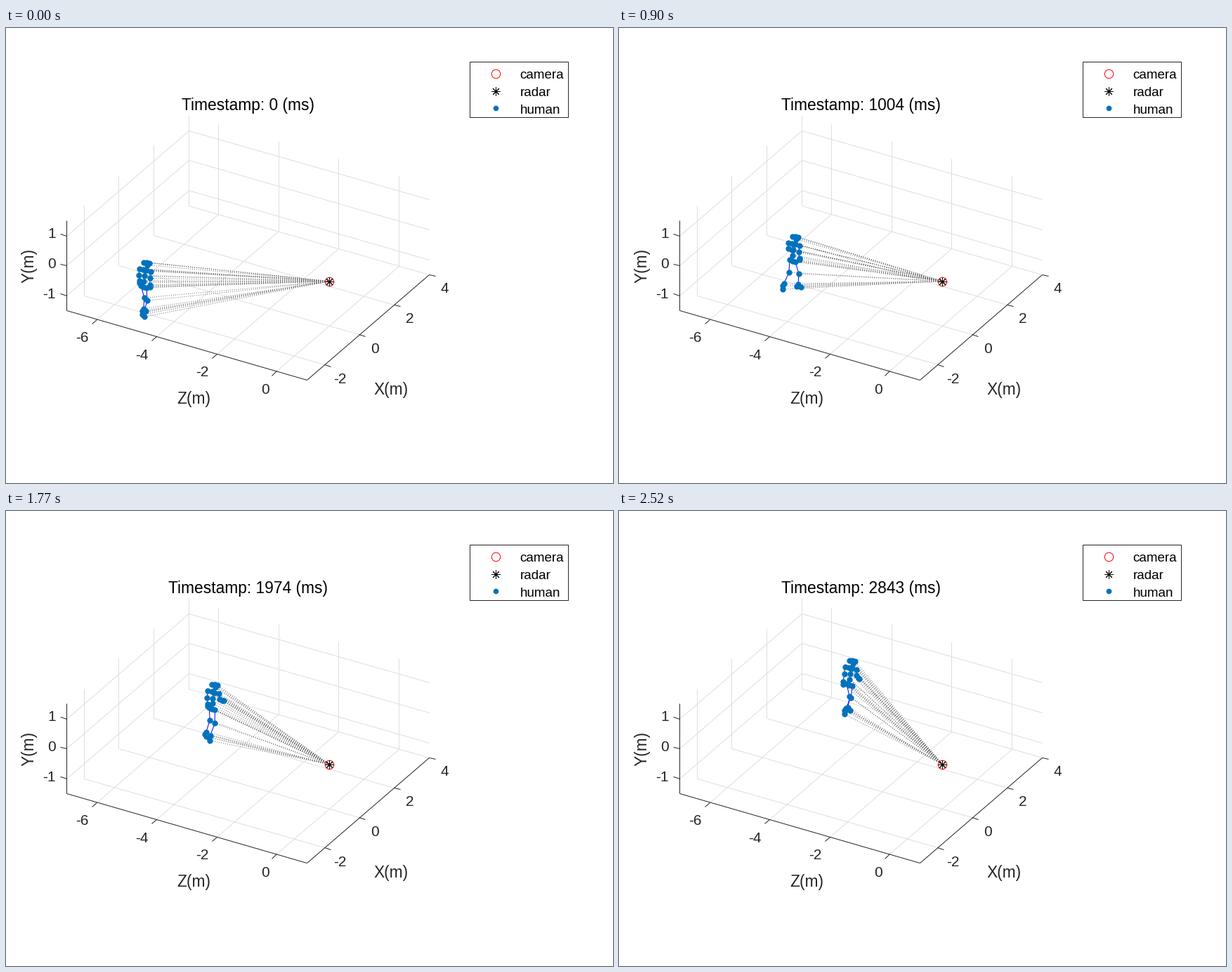
Write a matplotlib script that moves like this. It is 864 px wide and 648 px high and loops after 2550 ms.

```python
import numpy as np
import matplotlib.pyplot as plt
from matplotlib.animation import FuncAnimation
from matplotlib.collections import LineCollection

W, H, DPI = 864, 648, 150
FRAMES, INTERVAL = 85, 30
TICK_MS = 33.45          # sensor period
STRIDE = 750 / TICK_MS   # sensor ticks per walking cycle
THIN = 72 / DPI          # one pixel
INK, BLUE = "#262626", "#0072BD"

plt.rcParams["font.family"] = "Liberation Sans"
fig = plt.figure(figsize=(W / DPI, H / DPI), dpi=DPI, facecolor="white")
ax = fig.add_axes([0, 0, 1, 1])
ax.set_xlim(-0.5, W - 0.5)
ax.set_ylim(H - 0.5, -0.5)
ax.axis("off")

# Orthographic view: screen pixels per metre along each world axis
CORNER = np.array([86, 402.3])
AX_X = np.array([24.8, -21.4])
AX_Y = np.array([0, -42.7])
AX_Z = np.array([42.75, 12.3])


def project(x, y, z):
    return CORNER + (x + 3) * AX_X + (y + 1.5) * AX_Y + (z + 7) * AX_Z


def add_lines(pairs, color, order, style="solid"):
    lines = LineCollection(pairs, colors=color, linewidths=THIN, linestyles=style, zorder=order)
    lines.set_snap(False)
    return ax.add_collection(lines)


def label(x, y, text, size=10, color=INK, ha="center", **kw):
    return ax.text(x, y, text, fontsize=size, color=color, ha=ha, va=kw.pop("va", "baseline"), **kw)


def draw_box():
    grid, ticks = [], []
    for x in (-2, 0, 2, 4):
        end = project(x, -1.5, 1)
        grid += [(project(x, -1.5, -7), end), (project(x, -1.5, -7), project(x, 1.5, -7))]
        ticks.append((end, end + 0.21 * AX_Z))
        label(*(end + (22, 26)), str(x), ha="center")
    for z in (-6, -4, -2, 0):
        end = project(-3, -1.5, z)
        grid += [(end, project(4, -1.5, z)), (project(4, -1.5, z), project(4, 1.5, z))]
        ticks.append((end, end - 0.29 * AX_X))
        label(*(end + (-17 if z == 0 else -21, 32)), str(z))
    for y in (-1, 0, 1):
        end = project(-3, y, -7)
        grid += [(end, project(4, y, -7)), (project(4, y, -7), project(4, y, 1))]
        ticks.append((end, end - 0.21 * AX_Z))
        label(70.5, end[1] + 3.4, str(y), ha="right")
    low, front = project(-3, -1.5, -7), project(-3, -1.5, 1)
    edges = [(low, project(-3, 1.5, -7)), (low, front), (front, project(4, -1.5, 1))]
    add_lines(np.round(grid), "#dfdfdf", 1)
    add_lines(np.round(edges + ticks), INK, 2)
    label(267, 534, "Z(m)", 10.9)
    label(548, 521.5, "X(m)", 10.9)
    label(33, 338, "Y(m)", 10.9, rotation=90, va="center")


def draw_camera(x, y):
    ax.plot(x, y, "o", ms=6, mfc="none", mec="red", mew=THIN, zorder=7)


def draw_radar(x, y):
    ax.plot(x, y, marker=(8, 2, 0), ms=6, mec="black", mew=THIN, zorder=8)


def draw_legend():
    ax.add_patch(plt.Rectangle((660, 48), 140, 79, fc="white", ec=INK, lw=THIN, snap=False))
    draw_camera(696, 64)
    draw_radar(696, 89)
    ax.plot(696, 113, "o", ms=3.7, color=BLUE, mew=0)
    for i, name in enumerate(("camera", "radar", "human")):
        label(731, 71.5 + 24.8 * i, name, 9, "black", "left")


# Path of the neck on screen, and the body's fixed offsets from it
KEYS = np.array([0, 13, 30, 39, 51, 66, 85])
PATH = np.array([(197, 344), (210, 328), (248, 307), (265, 290), (281, 267), (306, 250), (329, 223)])
PELVIS = np.array([-1.5, 24])
HEAD = np.array([(3, -7), (-2, -11), (2, -11), (6, -10)])
SHOULDER = np.array([8, 2])
HIP = np.array([4, 1.5])
# Part of the cycle at which each limb is furthest forward, left then right
LEG_LEAD = (0.93, 0.28)
ARM_LEAD = (0.3, 0.65)


def spline(values, k):
    """Cubic Hermite curve through the key values."""
    slope = np.gradient(values, KEYS, axis=0)
    i = min(np.searchsorted(KEYS, k, side="right") - 1, len(KEYS) - 2)
    h = KEYS[i + 1] - KEYS[i]
    u = (k - KEYS[i]) / h
    return ((1 + 2 * u) * (1 - u) ** 2 * values[i] + u * (1 - u) ** 2 * h * slope[i]
            + u * u * (3 - 2 * u) * values[i + 1] + u * u * (u - 1) * h * slope[i + 1])


def angle(k, lead):
    return 2 * np.pi * (k / STRIDE - lead)


def leg(hip, a):
    """Knee, ankle, heel and toe; the foot lifts while it trails."""
    reach = 0.28 * np.cos(a) - 0.1
    lift = 0.28 * max(0, -np.cos(a - 0.17))
    ankle = hip + reach * AX_X + (lift - 0.84) * AX_Y
    knee = (hip + ankle) / 2 + 0.12 * AX_X - 0.08 * AX_Y
    toe = ankle + (2, 5) + 0.4 * reach * AX_X
    return [knee, ankle, ankle + (-2, 3), toe]


def arm(shoulder, a):
    """Elbow, wrist and hand, swinging about the shoulder."""
    swing = np.cos(a)
    elbow = shoulder + 0.04 * swing * AX_X - 0.22 * AX_Y
    hand = elbow + 0.15 * swing * AX_X + (0.08 * swing - 0.2) * AX_Y + (2, 0)
    return [elbow, elbow + 0.75 * (hand - elbow), hand]


def skeleton(k):
    """Chains of joints: spine with head, face, arms and legs."""
    neck = spline(PATH, k)
    pelvis = neck + PELVIS
    head = neck + HEAD
    spine = [neck + u * PELVIS for u in (1, 0.68, 0.36, 0)]
    chains = [spine + [head[0], head[2]], head[1:]]
    for sign, leg_lead, arm_lead in zip((-1, 1), LEG_LEAD, ARM_LEAD):
        shoulder, hip = neck + sign * SHOULDER, pelvis + sign * HIP
        chains.append([neck, neck + sign * 0.3 * SHOULDER, shoulder] + arm(shoulder, angle(k, arm_lead)))
        chains.append([pelvis, hip] + leg(hip, angle(k, leg_lead)))
    return [np.array(c) for c in chains]


draw_box()
draw_legend()
RADAR = project(0, 0, 0)
draw_camera(*RADAR)
draw_radar(*RADAR)
title = label(344, 117, "", 10.9, "black")
rays = add_lines([], "#707070", 3, [(0, (1, 2))])
bones = add_lines([], "blue", 4)
dots, = ax.plot([], [], "o", ms=4, color=BLUE, mew=0, zorder=5)


def update(n):
    k = n + (n > 75)   # the sensor drops one reading here
    chains = skeleton(k)
    joints = np.unique(np.vstack(chains), axis=0)
    title.set_text(f"Timestamp: {int(TICK_MS * k + 0.5)} (ms)")
    rays.set_segments([(RADAR, j) for j in joints])
    bones.set_segments(chains)
    dots.set_data(joints[:, 0], joints[:, 1])
    return title, rays, bones, dots


anim = FuncAnimation(fig, update, frames=FRAMES, interval=INTERVAL, repeat=True)
plt.show()
```
